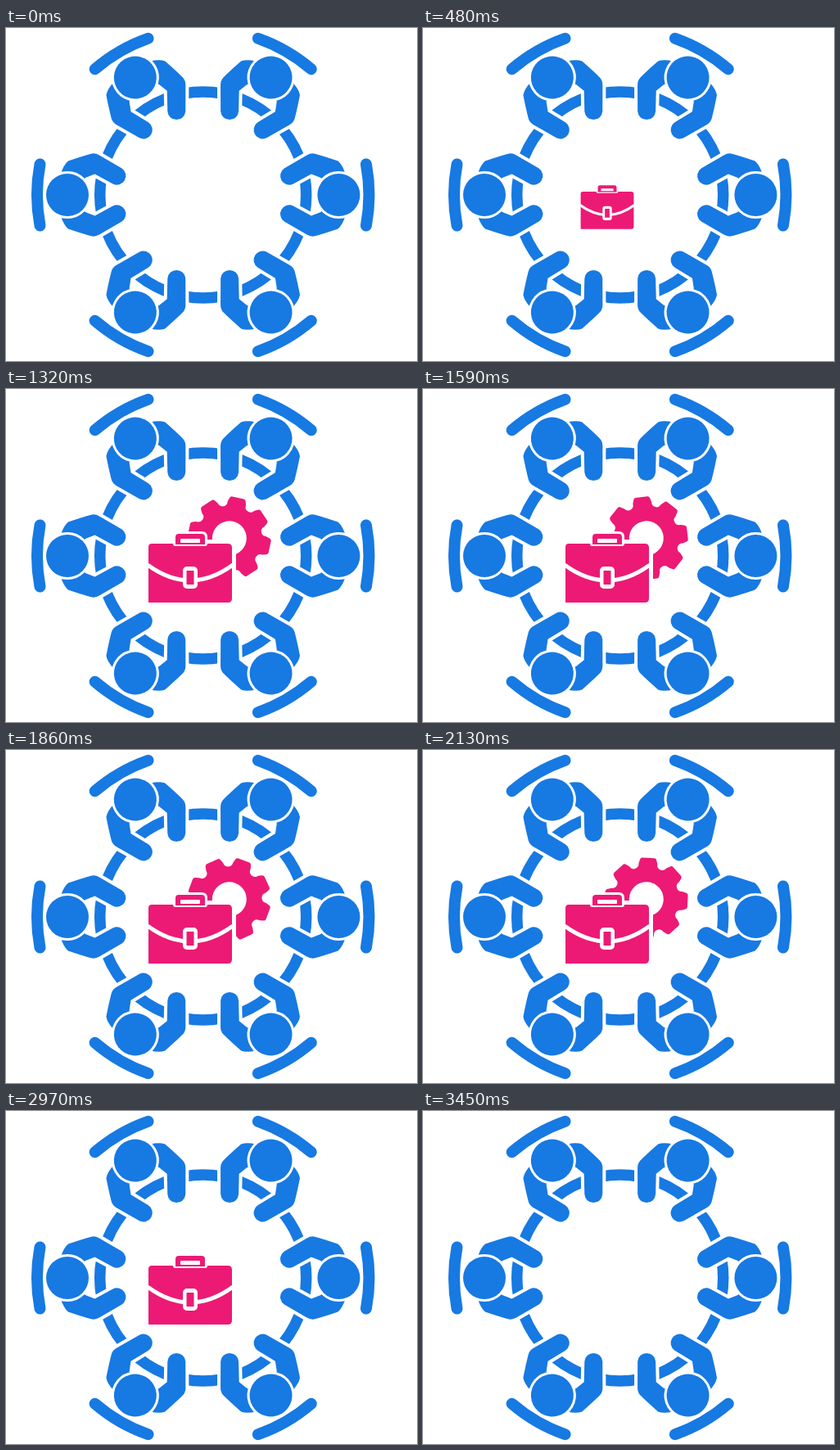
These frames come from a looping animation (502 px wide and 407 px high, 3600 ms). An HTML page:

```html
<!DOCTYPE html>
<html lang="en">
<head>
<meta charset="utf-8">
<title>Round table</title>
<style>
  html, body { margin: 0; width: 100%; height: 100%; overflow: hidden; background: #fff; }
  svg { display: block; width: 502px; height: 407px; }
</style>
</head>
<body>
<svg viewBox="0 0 502 407">
  <defs>
    <path id="arm" d="M67 178Q70.500 167 76 162.500Q92 157 104 153.700Q109 152.500 114 155.500L141.500 171.500A11 11 0 0 1 130.500 190.500L108.500 178.500L97 183L75 204Z"/>
    <g id="person">
      <g fill="#1779e2" stroke="#fff" paint-order="stroke">
        <g stroke-width="8">
          <use href="#arm"/>
          <use href="#arm" transform="matrix(1 0 0 -1 0 408)"/>
        </g>
        <circle cx="75" cy="204" r="26" stroke-width="6"/>
      </g>
      <path d="M41.500 166.500A203 203 0 0 0 41.500 241.500" fill="none" stroke="#1779e2" stroke-width="14" stroke-linecap="round"/>
    </g>
  </defs>
  <circle cx="240.700" cy="204" r="126" fill="none" stroke="#1779e2" stroke-width="13.500"/>
  <g id="people"></g>

  <g id="gear">
    <path id="cog" fill="#ec1a75" stroke="#ec1a75" stroke-width="6" stroke-linejoin="round"/>
    <circle r="21" fill="#fff"/>
  </g>

  <g id="bag">
    <g fill="#ec1a75" stroke="#fff" stroke-linejoin="round" paint-order="stroke">
      <path d="M-51 42V-26Q-51 -30 -47 -30H46Q51 -30 51 -25V37Q51 42 46 42Z" stroke-width="10"/>
      <path d="M-18 -30V-38Q-18 -42 -14 -42H14Q18 -42 18 -38V-30Z" stroke-width="6"/>
    </g>
    <path d="M-18 -31H18V-29H-18Z" fill="#ec1a75"/>
    <rect x="-12" y="-36" width="24" height="5" rx="1" fill="#fff"/>
    <path d="M-52 -4Q0 34 52 -4" fill="none" stroke="#fff" stroke-width="5"/>
    <rect x="-9" y="-2" width="18" height="27" rx="5" fill="#fff"/>
    <rect x="-4.500" y="3" width="9" height="17" fill="#ec1a75"/>
  </g>
</svg>
<script>
  const LOOP = 3600;
  const $ = id => document.getElementById(id);

  for (let i = 0; i < 6; i++) {
    $('people').innerHTML += `<use href="#person" transform="rotate(${i * 60} 240.7 204)"/>`;
  }

  // Eight teeth with round valleys between them
  const polar = (angle, r) => {
    const a = angle * Math.PI / 180;
    return `${(r * Math.sin(a)).toFixed(2)} ${(-r * Math.cos(a)).toFixed(2)}`;
  };
  let outline = '';
  for (let a = 0; a < 360; a += 45) {
    outline += (a ? 'A9.2 9.2 0 0 0 ' : 'M') + polar(a - 11, 44);
    outline += 'L' + polar(a - 8.5, 48) + 'L' + polar(a + 8.5, 48) + 'L' + polar(a + 11, 44);
  }
  $('cog').setAttribute('d', outline + 'A9.2 9.2 0 0 0 ' + polar(-11, 44) + 'Z');

  const progress = (t, from, to) => Math.min(1, Math.max(0, (t - from) / (to - from)));

  // Constant speed with a short ramp at both ends
  function ramped(p, r = 0.1) {
    if (p < r) return p * p / (2 * r * (1 - r));
    if (p > 1 - r) return 1 - ramped(1 - p, r);
    return (p - r / 2) / (1 - r);
  }

  function place(el, x, y, scale, angle = 0) {
    el.style.display = scale > 0 ? '' : 'none';
    el.setAttribute('transform', `translate(${x} ${y}) rotate(${angle}) scale(${scale})`);
  }

  function draw(t) {
    const bag = progress(t, 0, 757) - progress(t, 3150, 3450);
    const gear = progress(t, 765, 1140) - progress(t, 2700, 2970);
    place($('bag'), 225, 219, bag);
    place($('gear'), 272.8, 182.3, gear, 360 * ramped(progress(t, 1205, 2700)));
  }

  const start = performance.now();
  function tick() {
    draw((performance.now() - start) % LOOP);
    requestAnimationFrame(tick);
  }
  tick();
</script>
</body>
</html>
```
